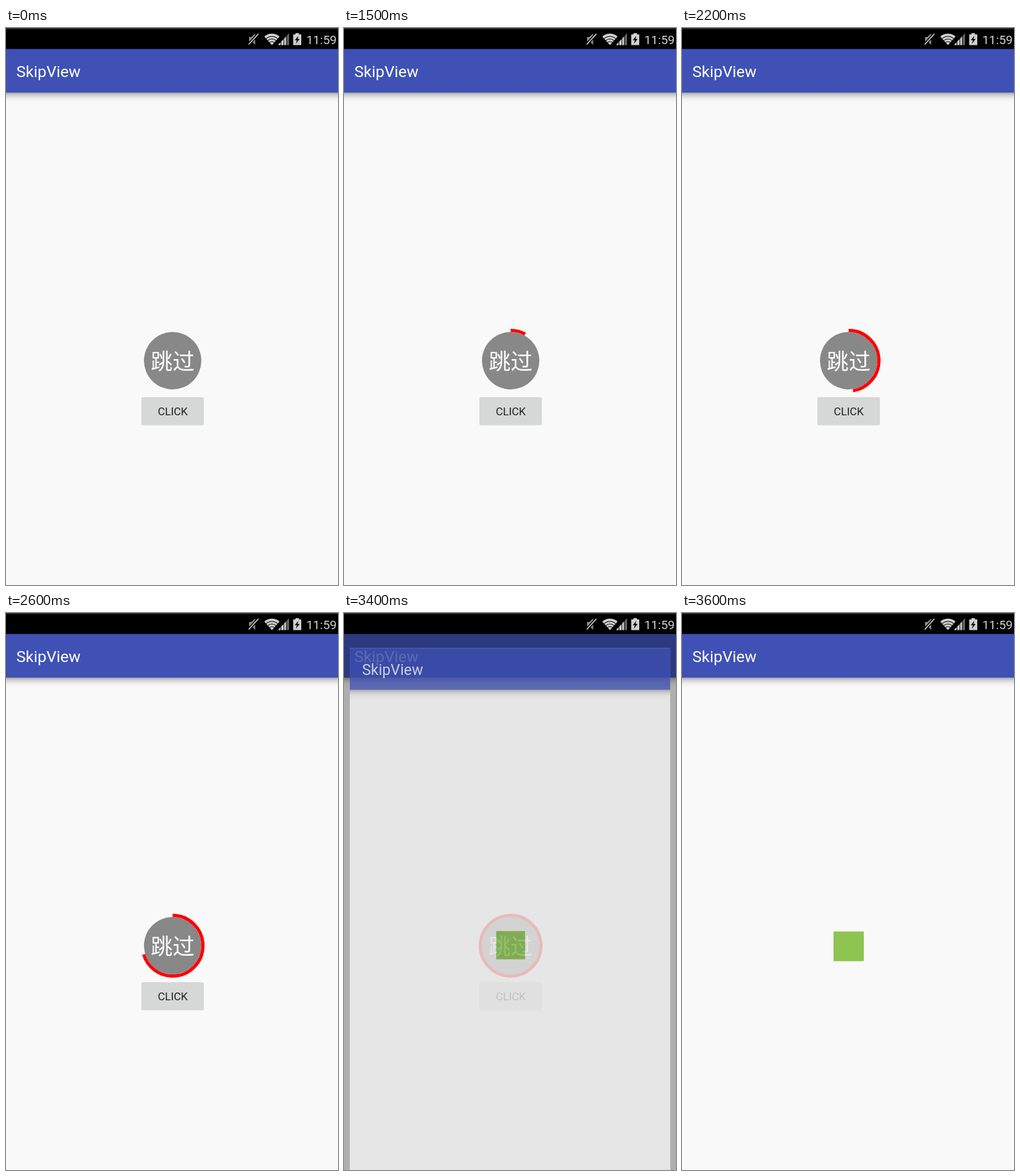
Animation of 515 by 863 pixels, one loop 6.8 s. Source, as an HTML page:

```html
<!DOCTYPE html>
<html lang="zh-CN">
<head>
<meta charset="utf-8">
<title>SkipView</title>
<style>
  html, body { margin: 0; width: 100%; height: 100%; overflow: hidden; background: #f9f9f9; }
  svg { display: block; width: 100%; height: 100%; }
  text { font-family: Roboto, sans-serif; }
  .skip { font-family: "Noto Sans CJK SC", "Noto Sans CJK", sans-serif; }
  #next { transform-origin: 258.5px 480px; }
</style>
</head>
<body>
<svg viewBox="0 0 515 863">
  <defs>
    <linearGradient id="shade" x2="0" y2="1">
      <stop offset="0" stop-opacity=".36"/>
      <stop offset=".25" stop-opacity=".17"/>
      <stop offset=".6" stop-opacity=".05"/>
      <stop offset="1" stop-opacity="0"/>
    </linearGradient>
    <clipPath id="fan"><path d="M412.5 26.5 400 12.5V5h25v7.5z"/></clipPath>
    <!-- wider than the stage, so the scaled page keeps its margins -->
    <g id="screen">
      <rect x="-4" y="32" width="523" height="920" fill="#f9f9f9"/>
      <rect x="-4" y="100" width="523" height="15" fill="url(#shade)"/>
      <rect x="-4" y="32" width="523" height="68" fill="#3f51b5"/>
      <text x="16" y="75.5" font-size="24.5" fill="#fff">SkipView</text>
    </g>
  </defs>

  <use href="#screen"/>
  <circle cx="258.5" cy="515.5" r="44.5" fill="#888"/>
  <text class="skip" x="224.5" y="529.2" font-size="34" fill="#fff">跳过</text>
  <circle id="ring" cx="258.5" cy="515.5" r="47" fill="none" stroke="#f00" stroke-width="5"
          pathLength="360" transform="rotate(-90 258.5 515.5)"/>
  <rect id="button" x="210" y="572" width="97" height="43.5" rx="2"/>
  <text x="258.7" y="600" font-size="17" text-anchor="middle" fill="#212121">CLICK</text>
  <rect id="dim" y="32" width="515" height="831"/>

  <g id="next">
    <use href="#screen"/>
    <rect x="235" y="493.5" width="47" height="46" fill="#8dc452"/>
  </g>

  <g fill="#d0d0d0">
    <rect width="515" height="32.5" fill="#000"/>
    <rect width="515" height="2" fill="#35232a"/>
    <path d="M377 14h3.5l6-5.5v17.5l-6-5.5h-3.5z" fill="#8c8c8c"/>
    <path d="M376.5 25.5 391.5 9" stroke="#000" stroke-width="4.5"/>
    <path d="M376.5 25.5 391.5 9" stroke="#d0d0d0" stroke-width="1.7"/>
    <g clip-path="url(#fan)">
      <circle cx="412.5" cy="26" r="17.3"/>
      <g fill="none" stroke="#000" stroke-width="1.1">
        <circle cx="412.5" cy="26" r="5"/>
        <circle cx="412.5" cy="26" r="9"/>
        <circle cx="412.5" cy="26" r="13"/>
      </g>
    </g>
    <path d="M422.5 26.5v-1l3.5-3.5v4.5zM427 26.5V21l3.5-3.7v9.2zM431.5 26.5V16.2l3-3.3v13.6z"/>
    <path d="M435.5 26.5V12l3.5-4v18.5z" fill="#666"/>
    <path d="M449 8h5.500v2h3.500v16.500h-12.500V10h3.500z"/>
    <path d="M453.500 12l-5.500 7h3.200l-1.700 5.500 6-7.500h-3.300z" fill="#000"/>
    <text x="513" y="25" font-size="19" text-anchor="end">11:59</text>
  </g>
</svg>

<script>
  const LOOP = 6800, TICK = 100;
  const PRESS = 1300, SWEEP = 1400, FULL = 3200, OPEN = 3400, SHOWN = 3600;
  const byId = id => document.getElementById(id);
  const [ring, button, dim, next] = ['ring', 'button', 'dim', 'next'].map(byId);

  // degrees clockwise from the top
  const sweepAt = t => t < SWEEP ? 0 : t >= FULL ? 360 : 90 + (t - 1800) * 0.204;

  function openingAt(t) {
    if (t < OPEN) return { alpha: 0, scale: 1 };
    if (t >= SHOWN) return { alpha: 1, scale: 1 };
    const rest = 1 - (t - OPEN + 73) / 300;
    return { alpha: 1 - rest ** 5, scale: 1 - 0.2 * rest ** 5 };
  }

  function draw(now) {
    const t = Math.floor(now % LOOP / TICK) * TICK;
    const angle = sweepAt(t);
    const { alpha, scale } = openingAt(t);
    ring.style.visibility = angle > 0 ? 'visible' : 'hidden';
    ring.style.strokeDasharray = angle < 360 ? `${angle} 720` : 'none';
    button.style.fill = t >= PRESS && t < SWEEP ? '#bcbcbc' : '#d6d7d7';
    dim.style.opacity = t >= OPEN ? 0.3 : 0;
    next.style.opacity = alpha;
    next.style.transform = `scale(${scale})`;
  }

  const start = performance.now();
  function frame() {
    draw(performance.now() - start);
    requestAnimationFrame(frame);
  }
  frame();
</script>
</body>
</html>
```
